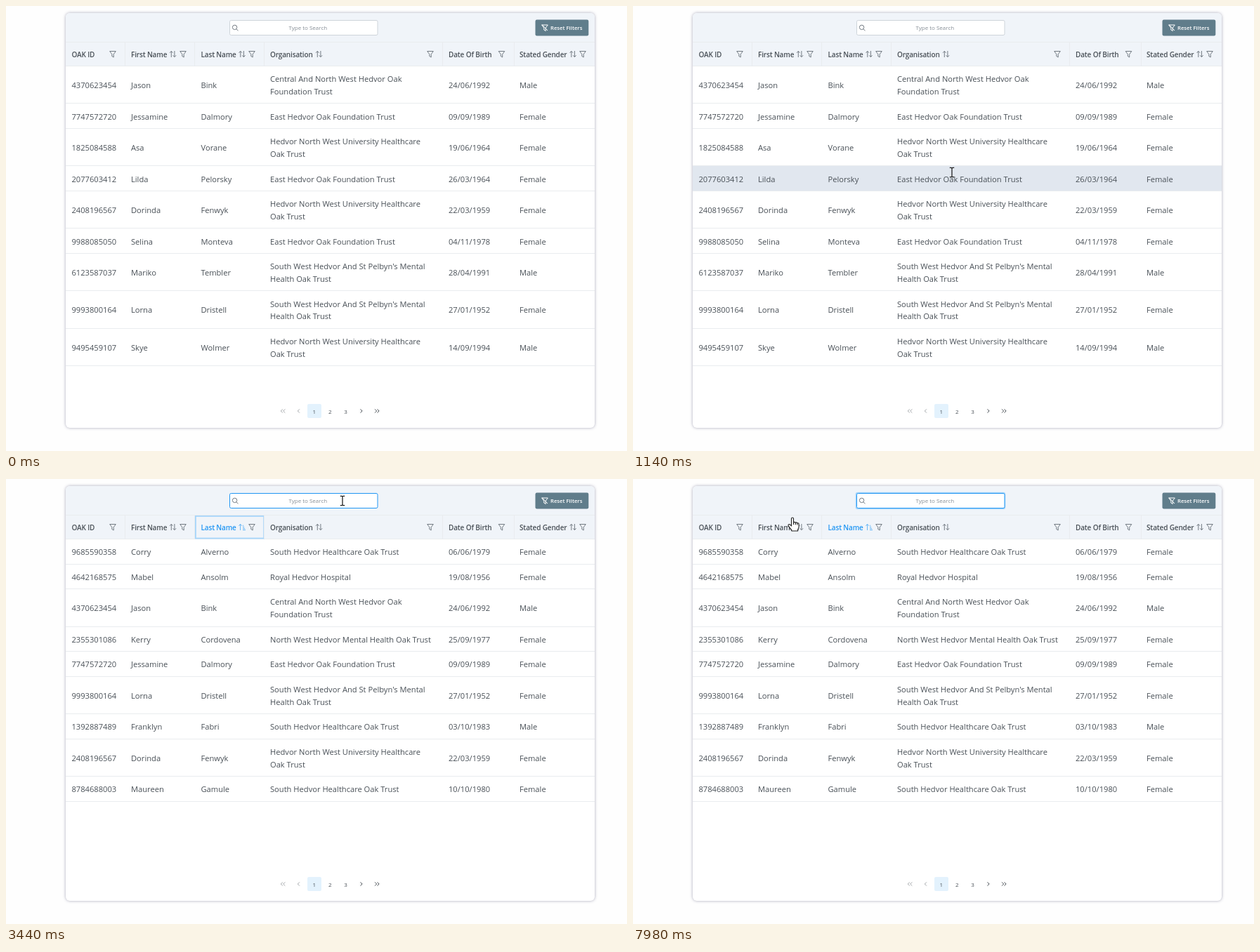
Animation, 884 px wide and 634 px high, one loop 8 s. Source, as an HTML page:

```html
<!DOCTYPE html>
<html lang="en">
<head>
<meta charset="utf-8">
<title>Patient table</title>
<style>
  html, body { margin: 0; width: 100%; height: 100%; overflow: hidden; background: #fefefe; }
  svg { display: block; width: 100%; height: 100%; }
  #card { filter: drop-shadow(0 0.5px 2px rgba(50, 50, 90, .42)); }
  text { font: 11.15px "Open Sans", "Noto Sans", sans-serif; fill: #495057; }
  .head { font-size: 10px; font-weight: 600; letter-spacing: -.15px; }
  .small { font-size: 8px; text-anchor: middle; }
  .hint { fill: #868e96; }
  .button { font-size: 7.7px; font-weight: 600; fill: #fff; }
  .icon { fill: none; stroke: #727a82; stroke-width: 1; }
  .sorted { fill: #2196f3; }
  .icon.sorted { fill: none; stroke: #64b5f6; }
  .line { fill: #e9ecef; shape-rendering: crispEdges; }
  .hover { fill: #e1e7ef; shape-rendering: crispEdges; }
  .chevron { fill: none; stroke: #495057; stroke-width: 1; }
  .off { opacity: .5; }
  .mouse { fill: #fff; stroke: #222; stroke-width: 1.1; stroke-linejoin: round; }
  #beam { fill: none; stroke: #222; stroke-width: 1.3; }
</style>
</head>
<body>
<svg viewBox="0 0 884 634">
  <defs>
    <path id="funnel" d="M-4.3-4H4.3L1.2 .2V4.5L-1.2 3V.2Z"/>
    <path id="sort" d="M-2.2 4.5V-4M-4.4-1.8L-2.2-4.2L0-1.8M2.4-4.5V4M.2 1.8L2.4 4.2L4.6 1.8"/>
    <path id="ascending" d="M-2.4 4.5V-4M-4.6-1.8L-2.4-4.2L-.2-1.8M1-2.2H2.4M1 0H3.2M1 2.1H4.2M1 4.1H5"/>
    <path id="chevron" d="M-1.3-2.6L1.3 0L-1.3 2.6"/>
  </defs>

  <g id="card">
    <rect x="85" y="10" width="753" height="591" rx="6" fill="#fff"/>
  </g>
  <path d="M85 86V16a6 6 0 0 1 6-6H832a6 6 0 0 1 6 6V86Z" fill="#f0f4f9"/>
  <rect class="line" x="85" y="51" width="753" height="1"/>
  <rect class="line" x="85" y="85" width="753" height="1"/>
  <rect x="753.5" y="19.5" width="75.8" height="23" rx="2.2" fill="#607d8b"/>
  <g transform="translate(767 31)" fill="none" stroke="#fff">
    <use href="#funnel"/>
    <path d="M-4-4.5L4 4"/>
  </g>
  <text class="button" x="775" y="34">Reset Filters</text>

  <g id="view"></g>
  <rect id="caret" y="25" width="1" height="12" fill="#333"/>

  <g id="cursor">
    <path id="arrow" class="mouse" d="M0 0V15.5L3.6 12.2L6 17.8L8.4 16.8L6 11.3H11Z"/>
    <path id="hand" class="mouse" d="M-1.5 12V1.5a1.5 1.5 0 0 1 3 0V7q1.4-1.2 2.8 .2q1.5-.8 2.6 .6q2.2-.4 2.2 1.6V13q0 2-1.5 4V19H-1q-.5-2-2.5-4L-5.8 11.5q-.6-2 1.2-2q1.5 .3 3.1 2.5ZM1.5 7v3M4.3 7.4v2.8M6.9 8v2.4"/>
    <path id="beam" d="M-3.2-6.6H-1Q0-6.6 0-5.6Q0-6.6 1-6.6H3.2M0-6V6M-3.2 6.6H-1Q0 6.6 0 5.6Q0 6.6 1 6.6H3.2"/>
  </g>
</svg>

<script>
const LOOP = 8000, LEFT = 85, WIDTH = 753, TOP = 86, PAGE_SIZE = 9, LINE = 17.8;

// label, left edge, text x, sort icon x, filter icon x
const columns = [
  ['OAK ID', 85, 93.5, 0, 152],
  ['First Name', 169, 178, 237.5, 252],
  ['Last Name', 268, 277.5, 336, 350],
  ['Organisation', 367, 376, 445.5, 604],
  ['Date Of Birth', 621, 630, 0, 705.5],
  ['Stated Gender', 723, 731, 807, 821]
];

const trusts = {
  central: 'Central And North West Hedvor Oak|Foundation Trust',
  east: 'East Hedvor Oak Foundation Trust',
  north: 'Hedvor North West University Healthcare|Oak Trust',
  west: "South West Hedvor And St Pelbyn's Mental|Health Oak Trust",
  south: 'South Hedvor Healthcare Oak Trust',
  royal: 'Royal Hedvor Hospital',
  mental: 'North West Hedvor Mental Health Oak Trust'
};

const people = `4370623454,Jason,Bink,central,24/06/1992,Male
7747572720,Jessamine,Dalmory,east,09/09/1989,Female
1825084588,Asa,Vorane,north,19/06/1964,Female
2077603412,Lilda,Pelorsky,east,26/03/1964,Female
2408196567,Dorinda,Fenwyk,north,22/03/1959,Female
9988085050,Selina,Monteva,east,04/11/1978,Female
6123587037,Mariko,Tembler,west,28/04/1991,Male
9993800164,Lorna,Dristell,west,27/01/1952,Female
9495459107,Skye,Wolmer,north,14/09/1994,Male
9685590358,Corry,Alverno,south,06/06/1979,Female
4642168575,Mabel,Ansolm,royal,19/08/1956,Female
2355301086,Kerry,Cordovena,mental,25/09/1977,Female
1392887489,Franklyn,Fabri,south,03/10/1983,Male
8784688003,Maureen,Gamule,south,10/10/1980,Female
5306142897,Adela,Marlond,central,17/02/1971,Female
6071938425,Berta,Norvane,east,08/12/1968,Female
3918264075,Gloria,Rimmold,west,30/05/1985,Female
7150482936,Gretchen,Ruthow,royal,11/07/1990,Female`
  .split('\n').map(line => line.split(','));

// Timelines: [start time, value]
const sortSteps = [[0, 0], [2330, 1], [2990, 2]];
const outlineSteps = [[0, 0], [2330, 1], [2990, 2], [3570, 0]];
const querySteps = [[0, ''], [4330, 'j'], [4990, 'ja'], [5720, 'j'], [6250, '']];
const glowSteps = [[0, 0], [3570, .5], [3710, 1]];
const caretSteps = [[0, 0], [3600, 430], [4130, 0], [4330, 431], [4860, 0], [4990, 433],
  [5450, 0], [5980, 431], [6250, 430], [6520, 0], [7050, 430], [7580, 0]];

// Pointer path: time, x, y
const path = [
  [440, 440, 496], [790, 445, 471], [1140, 454, 237], [1210, 458, 222], [1280, 457, 214],
  [1490, 330, 160], [1630, 212, 92], [1700, 180, 80], [1770, 169, 76], [2050, 200, 66],
  [2530, 207, 66], [2880, 300, 66], [3150, 312, 64], [3300, 420, 45], [3440, 479, 31],
  [6860, 479, 31], [6930, 486, 33], [7210, 640, 60], [7420, 751, 73], [7560, 740, 70],
  [7700, 715, 67], [7770, 600, 66], [7840, 450, 64], [7910, 310, 60], [7980, 227, 55]
];

const byId = id => document.getElementById(id);
const at = (steps, t) => steps.findLast(step => t >= step[0])[1];
// Whole-pixel baselines keep the small type crisp.
const text = (x, y, content, cls = '') => `<text class="${cls}" x="${x}" y="${Math.round(y)}">${content}</text>`;
const icon = (name, x, y, cls) => `<use href="#${name}" class="${cls}" transform="translate(${x} ${y})"/>`;
const rect = (x, y, w, h, attrs) => `<rect x="${x}" y="${y}" width="${w}" height="${h}" ${attrs}/>`;

function pointerAt(t) {
  const origin = [6930, 2880, 440].find(start => t >= start);
  if (!origin) return null;
  const time = origin + Math.floor((t - origin) / 70) * 70;
  const i = path.findLastIndex(p => time >= p[0]);
  const [t0, x0, y0] = path[i], [t1, x1, y1] = path[i + 1] || [t0 + 1, x0, y0];
  const k = (time - t0) / (t1 - t0);
  return { x: x0 + (x1 - x0) * k, y: y0 + (y1 - y0) * k };
}

function layoutRows(sort, query) {
  const rows = people.filter(p => `${p[1]} ${p[2]}`.toLowerCase().includes(query));
  if (sort) rows.sort((a, b) => a[sort].localeCompare(b[sort]));
  let top = TOP;
  return rows.slice(0, PAGE_SIZE).map(person => {
    const lines = trusts[person[3]].split('|');
    const height = LINE * (lines.length + 1);
    top += height;
    return { person, lines, top: top - height, height };
  });
}

function drawHeader(sort, outline) {
  return columns.map(([label, left, x, sortX, filterX], i) => {
    const active = i && i === sort ? ' sorted' : '';
    const next = columns[i + 1]?.[1];
    return (i ? rect(left, 52, 1, 33, 'class="line"') : '') +
      (i && i === outline ? rect(left + 1.9, 52.9, next - left - 1.8, 31.6,
        'fill="none" stroke="#a6d5fa" stroke-width="1.8"') : '') +
      text(x, 73, label, 'head' + active) +
      (sortX ? icon(active ? 'ascending' : 'sort', sortX, 68.5, 'icon' + active) : '') +
      icon('funnel', filterX, 68.5, 'icon');
  }).join('');
}

function drawRow({ person, lines, top, height }, hovered) {
  const base = top + height / 2 + 4.4;
  const cells = person.map((value, i) => i !== 3
    ? text(columns[i][2], base, value)
    : lines.map((line, n) =>
        text(columns[i][2], base + (n - (lines.length - 1) / 2) * LINE, line)).join(''));
  const start = Math.round(top), bottom = Math.round(top + height);
  return (hovered ? rect(LEFT, start, WIDTH, bottom - start, 'class="hover"') : '') +
    rect(LEFT, bottom - 1, WIDTH, 1, 'class="line"') + cells.join('');
}

function drawPager(pages) {
  const step = 22.3, first = 461.2 - step * (pages - 1) / 2;
  const chevrons = (x, flip, count, off) => Array.from({ length: count }, (_, i) =>
    `<use href="#chevron" class="chevron ${off}" transform="translate(${
      x + (i - (count - 1) / 2) * 3.4} 577) scale(${flip} 1)"/>`).join('');
  const forward = pages > 1 ? '' : 'off';
  let out = chevrons(first - 2 * step, -1, 2, 'off') + chevrons(first - step, -1, 1, 'off') +
    rect(Math.round(first - 10), 567, 20, 20, 'rx="2" fill="#e3f2fd"');
  for (let i = 0; i < pages; i++) out += text(first + i * step, 581, i + 1, 'small');
  return out + chevrons(first + pages * step, 1, 1, forward) +
    chevrons(first + (pages + 1) * step, 1, 2, forward);
}

function drawSearch(query, focused, glow) {
  return rect(317.5, 19.5, 212, 23, `rx="2.5" fill="none" stroke="#a6d5fa" stroke-width="1.6" opacity="${glow}"`) +
    rect(318.5, 20.5, 210.5, 21, `rx="2" fill="#fff" stroke="${focused ? '#2196f3' : '#ced4da'}"`) +
    '<g class="icon"><circle cx="325.6" cy="30.4" r="3.2"/><path d="M328 32.8L330.5 35.3"/></g>' +
    text(429.8, 34, query || 'Type to Search', query ? 'small' : 'small hint');
}

function pointerKind({ x, y }) {
  if (y < 51) return x > 318 && x < 529 && y > 20 && y < 42 ? 'beam' : 'arrow';
  if (y < TOP) return columns.findLast(c => x >= c[1])[3] ? 'hand' : 'arrow';
  return x > 376 && x < 605 ? 'beam' : 'arrow';
}

let lastKey;
function draw() {
  const t = performance.now() % LOOP;
  const sort = at(sortSteps, t), outline = at(outlineSteps, t);
  const query = at(querySteps, t), glow = at(glowSteps, t), focused = t >= 3440;
  const rows = layoutRows(sort, query);
  const pointer = pointerAt(t);
  const hovered = pointer ? rows.findIndex(r => pointer.y >= r.top && pointer.y < r.top + r.height) : -1;

  const key = [sort, outline, query, glow, focused, hovered].join();
  if (key !== lastKey) {
    lastKey = key;
    byId('view').innerHTML = drawHeader(sort, outline) +
      rows.map((row, i) => drawRow(row, i === hovered)).join('') +
      drawPager(query ? 1 : 3) + drawSearch(query, focused, glow);
  }

  const caretX = at(caretSteps, t);
  byId('caret').setAttribute('x', caretX);
  byId('caret').style.display = caretX ? '' : 'none';

  byId('cursor').style.display = pointer ? '' : 'none';
  if (pointer) {
    const kind = pointerKind(pointer);
    byId('cursor').setAttribute('transform', `translate(${pointer.x} ${pointer.y})`);
    for (const id of ['arrow', 'hand', 'beam']) byId(id).style.display = id === kind ? '' : 'none';
  }
  requestAnimationFrame(draw);
}
draw();
</script>
</body>
</html>
```
